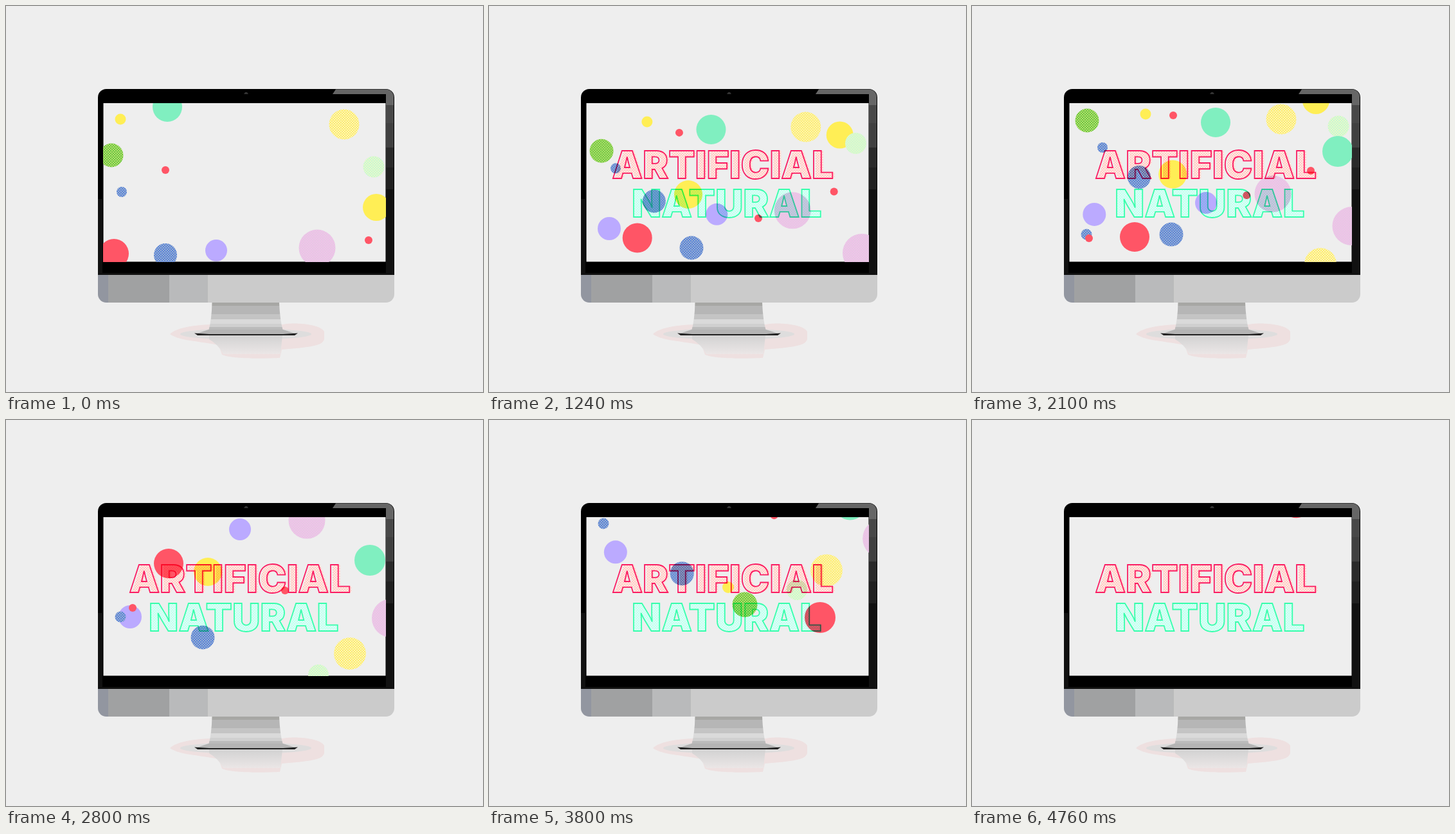
An HTML page that plays this animation: 742x600 px, repeating every 4780 ms.

```html
<!DOCTYPE html>
<html lang="en">
<head>
<meta charset="utf-8">
<title>Artificial Natural</title>
<style>
  html, body { margin: 0; width: 100%; height: 100%; overflow: hidden; background: #eee; }
  svg { display: block; width: 742px; height: 600px; }
  text { font: 900 59.5px Inter, Lato, sans-serif; letter-spacing: .5px; text-anchor: middle; }
  .line { fill: none; stroke-width: 1.8; }
  #title { mix-blend-mode: multiply; }
</style>
</head>
<body>
<svg viewBox="0 0 742 600" xmlns="http://www.w3.org/2000/svg">
  <defs id="defs">
    <clipPath id="screen"><rect x="151" y="151" width="440" height="247"/></clipPath>
    <linearGradient id="mirror" x2="0" y2="1">
      <stop offset="0" stop-color="#d2d2d2"/>
      <stop offset="1" stop-color="#ebe6e6"/>
    </linearGradient>
  </defs>

  <rect width="742" height="600" fill="#eee"/>

  <!-- shadow, reflection and stand -->
  <path d="M255 510C266 499 296 496 318 495H430C455 491 490 496 495 506V518C493 530 460 531 429 534L426 547C400 548 352 549 336 542L331 527C300 521 268 520 255 510Z" fill="#eee0e0"/>
  <ellipse cx="373" cy="510" rx="102" ry="9" fill="#dedddd"/>
  <path d="M316 512H430L427 541H338Q330 526 316 518Z" fill="url(#mirror)"/>
  <path d="M320.500 461H425Q426 488 431 505H315Q320 488 320.500 461Z" fill="url(#stand)"/>
  <path d="M315 503H431L453 510H294Z" fill="#b4b4b4"/>
  <path d="M293 508.500L316 510H431L454 508.500L449 512H298Z" fill="#222"/>

  <!-- monitor -->
  <path d="M143 418V142A13 13 0 0 1 156 129H591A13 13 0 0 1 604 142V418Z" fill="#000"/>
  <path d="M591 285H603V418H143V415H591ZM143 300H150V418H143Z" fill="#111"/>
  <path d="M513 129.500H591A12 12 0 0 1 603 142V285H591V137H508Z" fill="url(#gloss)"/>
  <path d="M370 137L372 134H375L377 137Z" fill="#333"/>
  <path d="M143 418H604V448A13 13 0 0 1 591 461H156A13 13 0 0 1 143 448Z" fill="url(#chin)"/>
  <rect x="151.500" y="151" width="439" height="246.500" fill="#eee"/>

  <g clip-path="url(#screen)">
    <g id="balls"></g>
    <g id="title"></g>
  </g>
</svg>
<script>
const LOOP = 4780, FLOOR = 408;
const $ = id => document.getElementById(id);
const clamp = v => Math.min(1, Math.max(0, v));
const mix = (a, b, k) => a + (b - a) * k;
const easeOut = (u, power) => 1 - (1 - u) ** power;

function make(tag, attrs, parent) {
  const el = document.createElementNS('http://www.w3.org/2000/svg', tag);
  for (const k in attrs) el.setAttribute(k, attrs[k]);
  return parent.appendChild(el);
}

// Gradient of flat bands, each "colour end"
function bands(id, dir, ...list) {
  const g = make('linearGradient', { id, ...dir }, $('defs'));
  let from = 0;
  for (const band of list) {
    const [color, end] = band.split(' ');
    for (const offset of [from, end]) make('stop', { offset, 'stop-color': color }, g);
    from = end;
  }
}
const down = { x2: 0, y2: 1 };
bands('gloss', down, '#666 .16', '#484848 .34', '#404040 .58', '#2a2a2a .78', '#202020 1');
bands('stand', down, '#a7a7a4 .12', '#b6b6b6 .4', '#c4c4c4 .6', '#dadada .76', '#d0d0d0 .87', '#bbb 1');
bands('chin', {}, '#9296a0 .035', '#a0a1a2 .24', '#b9babb .37', '#cbcbcb 1');

// A ground colour with staggered dots
function halftone(id, ground, dot) {
  const p = make('pattern', { id, width: 4, height: 4, patternUnits: 'userSpaceOnUse' }, $('defs'));
  make('rect', { width: 4, height: 4, fill: ground }, p);
  for (const c of [1, 3]) make('circle', { cx: c, cy: c, r: 1.05, fill: dot }, p);
  return `url(#${id})`;
}

const looks = {
  yellow: '#ffee55', green: '#80efc0', red: '#ff5566', purple: '#bbaaff',
  blue: halftone('blue', '#5682dc', '#a4b6cc'),
  lime: halftone('lime', '#66c944', '#c6df70'),
  pink: halftone('pink', '#f2bfeb', '#e2cee0'),
  mint: halftone('mint', '#c4f8d6', '#f2f8c4'),
  sun: halftone('sun', '#ffee68', '#fbf4c8')
};

const balls = [];

// Each ball: look, radius, place at t0, place at t1, early bob
function group(motion, ...list) {
  for (const [look, r, from, to, bob = 0] of list) {
    const el = make('circle', { r, fill: looks[look] }, $('balls'));
    balls.push({ ...motion, el, r, from, to, bob });
  }
}

group({ enter: 0, t0: 0, t1: 2100, lift: 224, settle: true },
  ['yellow', 8.5, [178, 176], [270, 168]],
  ['green', 23, [251, 157], [379, 181], 19],
  ['lime', 18.5, [164, 232], [179, 178], 60],
  ['red', 6, [248, 255], [313, 170], -14],
  ['blue', 8, [180, 289], [203, 220], 11],
  ['red', 23, [168, 385], [253, 359], -40],
  ['blue', 18, [248, 387], [260, 266], -11],
  ['purple', 17, [327, 380], [364, 306], -30],
  ['pink', 28.5, [484, 376], [468, 292], -16],
  ['red', 6, [564, 364], [527, 256], -15],
  ['yellow', 21, [576, 313], [535, 147]],
  ['mint', 16.5, [572, 250], [570, 187]],
  ['sun', 23.5, [526, 184], [481, 176]]);

group({ enter: 760, t0: 1240, t1: 2800, lift: 75 },
  ['yellow', 22, [310, 293], [314, 236]],
  ['red', 6, [419, 330], [434, 265]],
  ['purple', 18, [187, 346], [193, 306]],
  ['blue', 18.5, [315, 376], [306, 338]],
  ['pink', 30, [580, 384], [599, 308]]);

group({ enter: 1300, t0: 2100, t1: 2800, lift: 75 },
  ['green', 24, [569, 226], [566, 218]],
  ['blue', 8.5, [178, 355], [178, 306]],
  ['red', 6, [182, 361], [197, 292]],
  ['sun', 25, [542, 401], [535, 363]]);

group({ enter: 2600, t0: 2800, t1: 3800, lift: 75 },
  ['mint', 16, [486, 396], [479, 264]]);

group({ enter: 3050, t0: 3800, t1: 4340, lift: 590 },
  ['yellow', 9, [372, 260], [370, 240]],
  ['lime', 19.5, [398, 287], [396, 265]],
  ['red', 24, [515, 307], [509, 305]]);

// Rise from the floor, drift, then speed away upwards
function place({ enter, t0, t1, lift, settle, r, from, to, bob }, t) {
  if (t < t0) {
    const k = easeOut((t - enter) / (t0 - enter), 3);
    return [from[0], mix(FLOOR + r, from[1], k)];
  }
  let u = (t - t0) / (t1 - t0), sway = 0;
  if (settle) {
    u = clamp(u);
    sway = bob * 9.5 * u * (1 - u) ** 3 + 10 * Math.max(0, Math.sin((u - 0.33) * 6));
    if (u < 0.33) sway = bob * 9.5 * u * (1 - u) ** 3;
    u = easeOut(u, 1.5);
  }
  const away = lift * Math.max(0, (t - t1) / 1000) ** 1.4;
  return [mix(from[0], to[0], u), mix(from[1], to[1], u) + sway - away];
}

// Outlined lettering over an offset halftone
function word(chars, x, y, line, fill, shift) {
  make('text', { x: x + shift, y, fill }, $('title')).textContent = chars;
  make('text', { x, y, class: 'line', stroke: line }, $('title')).textContent = chars;
}
word('ARTIFICIAL', 364, 267.5, '#fb1c62', halftone('rose', '#ffe9e4', '#ffc8c0'), 3);
word('NATURAL', 370, 327.5, '#36ffac', halftone('aqua', '#dcfff6', '#c0fff0'), 1);

function draw(t) {
  for (const ball of balls) {
    const shown = t >= ball.enter;
    ball.el.style.display = shown ? '' : 'none';
    if (shown) ball.el.setAttribute('transform', `translate(${place(ball, t)})`);
  }
  $('title').style.opacity = clamp((t - 100) / 400);
}

let start;
function tick(now) {
  start ??= now;
  draw((now - start) % LOOP);
  requestAnimationFrame(tick);
}
draw(0);
requestAnimationFrame(tick);
</script>
</body>
</html>
```
